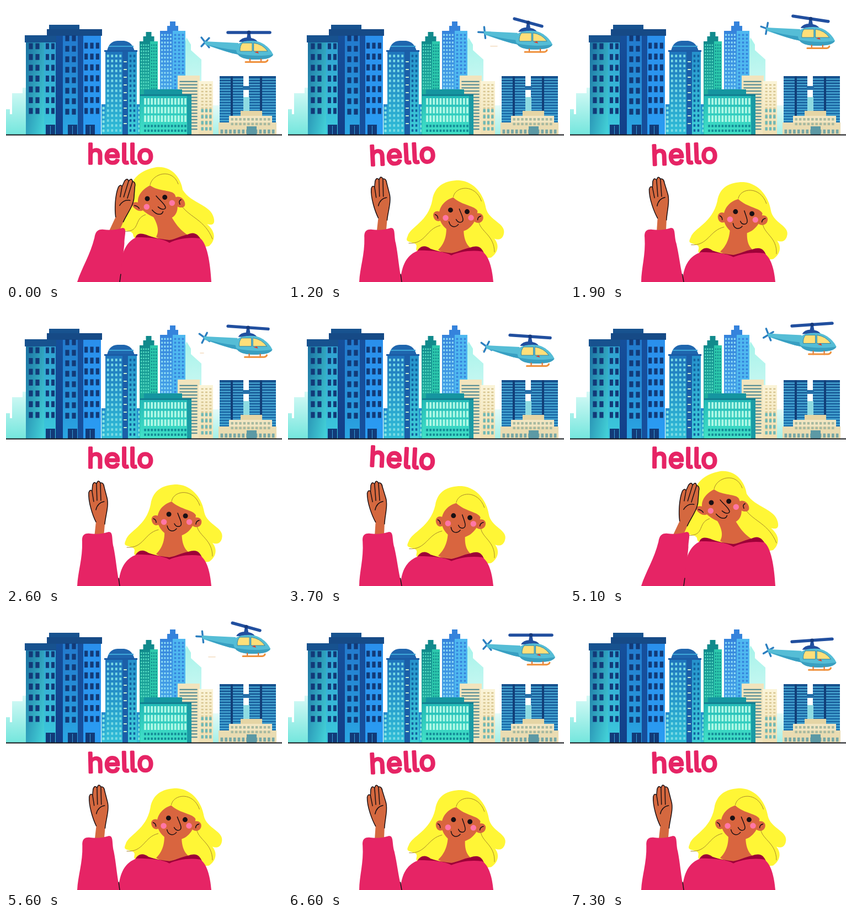
Write an HTML page that moves like this. It is 500 px wide and 500 px high and loops after 7.4 s.

```html
<!DOCTYPE html>
<html lang="en">
<head>
<meta charset="utf-8">
<title>Hello city</title>
<style>
html, body { margin: 0; width: 100%; height: 100%; overflow: hidden; background: #fff; }
svg { display: block; width: 100vw; height: 100vh; }
path { stroke-linecap: round; stroke-linejoin: round; }
#hello { font: 400 50px Inter, "Open Sans", sans-serif; font-feature-settings: "cv05"; letter-spacing: 1.2px; fill: #e62465; stroke: #e62465; stroke-width: 3.6; stroke-linejoin: round; }
.ink { fill: none; stroke: #1a1014; stroke-width: 1.5; }
.strand { fill: none; stroke: #a8862a; stroke-width: 1; }
.skin { fill: #d9653f; }
.dot { fill: none; stroke: #1a1014; stroke-width: 9; }
.cheek { fill: none; stroke: #ff77a6; stroke-width: 10.5; }
.cloth { fill: #e62465; }
</style>
</head>
<body>
<svg viewBox="0 0 500 500" preserveAspectRatio="xMidYMid meet">
  <defs id="defs"></defs>
  <g id="city"></g>
  <path id="streak" stroke="#f3dcc0" stroke-width="1.6"/>
  <g id="heli">
    <path id="tail" d="M-7,-9L7,9M7,-8L-7,7" stroke="#2c7fc0" stroke-width="3.4"/>
    <path d="M359,64L421,67V88Q400,84 361,70Z" fill="#55bdd6"/>
    <path d="M365,70Q400,79 421,80V88Q400,84 365,70Z" fill="#389fc2"/>
    <path d="M422,65Q426,57 438,57Q452,58 456,65Z" fill="#214f9f"/>
    <path d="M436,58L438,47H442L444,58Z" fill="#214f9f"/>
    <path d="M417,79C416,66 430,63 446,63C465,63 479,77 484,88C481,95 468,97 450,97C430,97 418,91 417,79Z" fill="#55bdd6"/>
    <path d="M419,86C440,91 465,91 484,88C481,95 468,97 450,97C433,97 422,93 419,86Z" fill="#3a9fc0"/>
    <path d="M428,67H446V82H424Q423,73 428,67ZM449,67Q465,69 474,82H449Z" fill="#ffdf79" stroke="#38859f" stroke-width="1"/>
    <path d="M450,84L456,82L458,86Z" fill="#d8402f"/>
    <path d="M442,96V102M462,96V102" stroke="#d86a2b" stroke-width="2"/>
    <path d="M434,101.5H469Q473,101 474,98" fill="none" stroke="#f0903a" stroke-width="3"/>
    <path id="blade" stroke="#214f9f" stroke-width="5.5"/>
    <circle cx="440" cy="48" r="3.4" fill="#163a7d"/>
  </g>
  <text id="hello" x="147" y="286">hello</text>
  <g id="body">
    <path fill="#fff636" d="M262,352C266,324 288,316 310,316C340,318 356,345 359,366C364,390 397,394 391,414C388,425 380,424 374,422C384,434 380,448 368,456L330,460L240,446C224,444 240,434 228,430C218,426 212,428 217,417C222,400 254,392 262,352Z"/>
    <path class="skin" d="M286,388C289,408 287,428 272,442C285,452 325,452 336,442C320,434 317,416 319,392Z"/>
    <path class="skin" d="M277,374C269,369 262,374 264,382C266,390 273,392 278,388ZM340,377C348,373 356,378 354,386C352,394 344,395 338,391Z"/>
    <path class="skin" d="M300,347C284,352 274,364 274,380C275,393 286,409 303,410C324,412 341,397 344,372C340,362 316,362 300,347Z"/>
    <path class="ink" d="M267,378C270,379 272,381 272,385M350,381C346,382 344,384 344,388M311,368C314,377 322,390 314,392C310,393 307,391 305,387M292,391C294,401 303,403 309,396"/>
    <path class="cheek" d="M286,384L286,384M332,384L332,384"/>
    <path class="dot" d="M295,370L295,370M325,373L325,373"/>
    <path class="strand" d="M300,346C304,326 340,322 351,354M276,398C250,404 250,432 219,430M346,392C350,410 374,416 374,446"/>
    <path fill="#9d0038" d="M234,445C240,433 250,434 258,440C272,445 286,447 296,448C308,446 318,440 330,438C344,433 352,436 357,454L240,456Z"/>
    <path class="cloth" d="M204,500L205,487C208,468 216,450 237,443C262,443 284,445 296,452C310,446 330,442 352,445C364,453 370,475 372,500Z"/>
  </g>
  <g id="hand">
    <path id="palm" fill="#d4683f" d="M160,412L163,384C157,372 149,348 150,331Q152,324 156,328L157,317Q160,309 164,315Q167,306 171,313Q177,312 178,321L183,340C187,354 180,374 179,388L177,412Z"/>
    <path class="ink" d="M163,384C157,372 149,348 150,331Q152,324 156,328L157,317Q160,309 164,315Q167,306 171,313Q177,312 178,321L183,340C187,354 180,374 179,388M156,328L159,347M164,315L165,345M171,313L172,345M163,362Q166,349 178,347"/>
  </g>
  <g id="sleeve">
    <path class="cloth" d="M129,500C130,475 139,450 138,420C137,408 142,404 152,405C165,407 176,405 186,402C195,402 191,415 195,430C199,450 201,475 206,500Z"/>
    <path class="ink" d="M204,486L206,500"/>
  </g>
</svg>
<script>
const $ = id => document.getElementById(id);
const { sin, cos, PI, min, max } = Math;
const TAU = 2 * PI, LOOP = 7400, STEP = 100, GROUND = 233;
const clamp = v => min(1, max(0, v));

// City
let art = "", defs = "", count = 0;
const shape = (d, fill) => { art += `<path d="${d}" fill="${fill}"/>`; };
const box = (x, y, r, b, fill) => shape(`M${x},${y}H${r}V${b}H${x}Z`, fill);
const grad = (a, b, flat) => {
  const id = "g" + count++;
  defs += `<linearGradient id="${id}" x2="${flat ? 1 : 0}" y2="1"><stop stop-color="${a}"/><stop offset="1" stop-color="${b}"/></linearGradient>`;
  return `url(#${id})`;
};
const wall = (x, y, r, a, b = a, flat) => box(x, y, r, GROUND, grad(a, b, flat));
// Even windows: fx and fy are the glazed share of each cell
const windows = (x, y, r, b, cols, rows, fill, fx = .6, fy = .55) => {
  const w = (r - x) / cols, h = (b - y) / rows;
  let d = "";
  for (let i = 0; i < cols * rows; i++) {
    const left = x + w * (i % cols + (1 - fx) / 2), top = y + h * (Math.floor(i / cols) + (1 - fy) / 2);
    d += `M${left},${top}h${w * fx}v${h * fy}h${-w * fx}z`;
  }
  shape(d, fill);
};

function apartments() {
  const navy = "#123a78", roof = "#17528f";
  wall(36, 60, 70, "#1a6ea0", "#45d6da", true);
  wall(69, 60, 91, "#2f9fd0", "#3cc9dc");
  wall(90, 50, 104, "#15509c", "#123f88");
  wall(103, 48, 131, "#2277cc", "#2aa6e2");
  wall(130, 48, 141, "#164f9c");
  wall(140, 48, 172, "#2a8fec", "#2a9cf2");
  box(78, 34, 133, 44, roof);
  box(34, 53, 91, 66, roof);
  box(74, 42, 174, 54, "#164a86");
  windows(39, 63, 63, 200, 2, 7, navy);
  windows(70, 63, 90, 200, 2, 7, navy);
  windows(105, 49, 129, 201, 2, 8, navy);
  windows(140, 62, 171, 200, 3, 7, navy);
  for (const x of [72, 112, 144]) {
    box(x, 215, x + 17, GROUND, navy);
    box(x + 8, 217, x + 9, GROUND, "#3aa0d8");
  }
}

function domeTower() {
  shape("M183,82Q186,64 202,63H214Q229,65 233,82Z", "#1f66ae");
  box(186, 72, 231, 74, "#3da6d8");
  wall(173, 178, 246, "#2588cc", "#35bfd8");
  wall(180, 80, 213, "#1f74bd", "#30bfd8");
  wall(212, 80, 237, "#2590cc", "#3fd0d8");
  box(178, 80, 238, 83, "#1a5ba5");
  box(211, 82, 221, GROUND, "#1b5fa8");
  windows(181, 86, 211, 230, 4, 16, "#7bdbe4", .5, .5);
  windows(222, 86, 236, 230, 2, 16, "#125f9f", .5, .5);
  windows(173, 181, 180, 230, 1, 6, "#86e6e4");
  windows(238, 181, 246, 230, 1, 6, "#86e6e4");
  windows(212, 94, 220, 220, 1, 9, "#c8f0d0", .7, .15);
}

function highRise(x, mid, r, top, dark, light, glass) {
  const c = (x + r) / 2;
  box(c - 5, top - 17, c + 5, top, dark);
  box(c - 10, top - 9, c + 10, top, dark);
  wall(x, top, mid, dark, light);
  wall(mid, top, r, light, light);
  windows(x + 1, top + 4, mid - 1, 152, 4, 15, glass, .55, .5);
  windows(mid + 1, top + 4, r - 1, 152, 3, 15, dark, .5, .5);
}

function offices() {
  wall(311, 126, 351, "#f1e4bd");
  wall(349, 136, 375, "#fbf4d8", "#efdfb2");
  windows(313, 134, 348, 226, 1, 16, "#5b8f95", .92, .42);
  windows(352, 140, 374, 218, 3, 13, "#d7c590", .55, .4);
  windows(352, 184, 374, 228, 3, 4, "#6fb8b5");
  box(250, 151, 319, 162, "#1595a0");
  wall(243, 160, 336, "#22b8b6", "#42e2c8");
  box(243, 160, 336, 163, "#127f91");
  box(328, 163, 336, GROUND, "#1a9aa4");
  windows(249, 165, 328, 212, 13, 3, "#b0f8e6", .62, .75);
  windows(249, 213, 328, 230, 13, 2, "#148a96", .6, .5);
}

function twinTowers() {
  for (const [x, r] of [[387, 430], [440, 489]]) {
    wall(x, 127, r, "#15508d", "#1d78b6");
    windows(x, 130, r, 230, 1, 20, "#4fb2dc", 1, .36);
    box(x + 20, 127, x + 24, GROUND, "#123f78");
  }
  box(429, 145, 442, 152, "#256fa9");
  wall(430, 165, 441, "#8edbe2");
  wall(425, 190, 464, "#e5d5a5");
  wall(404, 199, 482, "#f2e6c2");
  wall(385, 211, 490, "#eadcb2");
  windows(406, 201, 480, 218, 10, 2, "#a7b9a0");
  windows(387, 222, 488, GROUND, 13, 1, "#77a7a5", .6, .7);
  box(436, 218, 454, GROUND, "#5c99a5");
}

function drawCity() {
  const mist = grad("#d6faf6", "#74e6dd");
  shape("M0,233V187H7V196H11V158H30V148H40V233Z", mist);
  shape("M322,233V75L327,57L335,70V80L354,97V233Z", grad("#a6f3ea", "#eefcfa"));
  wall(374, 180, 390, "#e4fbf8", "#a5f0e6");
  apartments();
  domeTower();
  highRise(242, 261, 275, 64, "#118a8c", "#2cc8ac", "#55dcc2");
  highRise(279, 302, 325, 45, "#3583dc", "#4fb8f0", "#8edcf4");
  offices();
  twinTowers();
  box(0, 232.6, 500, 234.6, "#16181c");
}

// Moves every "x,y" pair of the paths in a group
const deform = (id, move) => {
  const parts = [...$(id).querySelectorAll("path")].map(p => [p, p.getAttribute("d")]);
  return k => parts.forEach(([p, d]) => p.setAttribute("d",
    d.replace(/([\d.]+),([\d.]+)/g, (_, x, y) => move(+x, +y, k).map(v => v.toFixed(2)).join())));
};
// The head shifts and tips, the chest rises, the hem stays
const bendBody = deform("body", (x, y, k) => {
  const neck = clamp((440 - y) / 70), chest = clamp((500 - y) / 50);
  return [x - 39 * k * neck, y - k * (24 * chest + .19 * (x - 311) * neck)];
});
const bendSleeve = deform("sleeve", (x, y, k) => [x + 25 * k * clamp((500 - y) / 90), y]);

const WAVE = 1.7, HOVER = 3.7, ROCK = 5.2, SHAKE = 11;

// A sprung swing towards the listening pose, mirrored in time
const lean = t => {
  const u = t % WAVE, d = min(u, WAVE - u);
  return Math.exp(-7 * d) * cos(TAU * d / .6);
};

function moveHeli(t, n) {
  const turn = 8 * PI * n / SHAKE;
  const dx = 2.5 * (cos(5 * TAU * n / SHAKE) - 1);
  const dy = 12.5 * (cos(TAU * t / HOVER) - 1);
  const bx = 38 * cos(turn), by = -9 * sin(turn);
  $("heli").setAttribute("transform", `translate(${dx} ${dy})`);
  $("blade").setAttribute("d", `M${440 - bx},${48 - by}L${440 + bx},${48 + by}`);
  $("tail").setAttribute("transform", `translate(361 66) rotate(${turn * 180 / PI})`);

  const age = n % SHAKE, gust = Math.floor(n / SHAKE);
  const seen = age > 0 && age < 5;
  $("streak").setAttribute("d", seen ? `M${372 - 5 * age},${75 + 3 * sin(4 * gust)}h${14 - 2 * age}` : "");
}

function render(n) {
  const t = n * STEP / 1000, k = lean(t);
  moveHeli(t, n);
  $("hello").setAttribute("transform", `rotate(${-3 * sin(TAU * t / ROCK)} 210 268)`);
  bendBody(k);
  bendSleeve(k);
  $("hand").setAttribute("transform", `translate(${30 * k} 0) rotate(${19 * k} 171 400)`);
}

drawCity();
$("defs").innerHTML = defs;
$("city").innerHTML = art;

const start = performance.now();
function tick() {
  render(Math.floor((performance.now() - start) % LOOP / STEP));
  requestAnimationFrame(tick);
}
tick();
</script>
</body>
</html>
```
